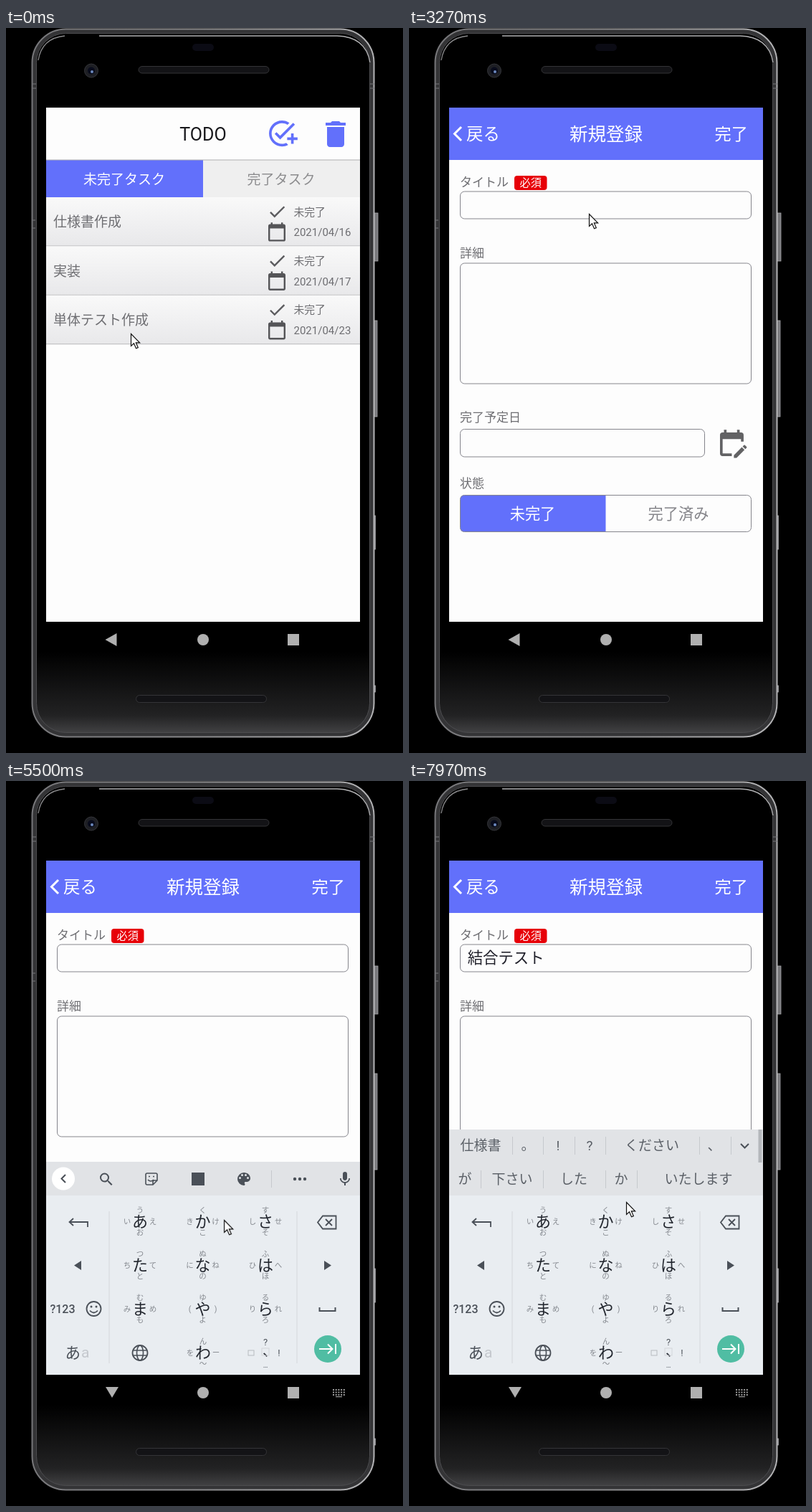
Write an HTML page that moves like this. It is 554x1011 px and loops after 8000 ms.

```html
<!DOCTYPE html>
<html lang="ja">
<head>
<meta charset="utf-8">
<title>TODO</title>
<style>
html, body { margin: 0; width: 100%; height: 100%; overflow: hidden; background: #000; }
svg { display: block; width: 554px; height: 1011px; }
text { font-family: Roboto, "Noto Sans CJK JP", "Noto Sans CJK", sans-serif; white-space: pre; }
.step { animation: 8s step-end infinite; }
.list { animation-name: list; }
.form { animation-name: form; }
.idle { animation-name: idle; }
.typing { animation-name: typing; }
.done { animation-name: done; }
.plain { animation-name: plain; }
.closed { animation-name: closed; }
.open { animation-name: open; }
.caret { animation-name: caret; }
.caret2 { animation-name: caret2; }
.keyboard { animation: rise 8s linear infinite; }
.cursor { animation: move 8s ease-in-out infinite; }
@keyframes list { 0% { opacity: 1 } 28%, to { opacity: 0 } }
@keyframes form { 0% { opacity: 0 } 28%, to { opacity: 1 } }
@keyframes closed { 0% { opacity: 1 } 49%, to { opacity: 0 } }
@keyframes open { 0% { opacity: 0 } 49%, to { opacity: 1 } }
@keyframes idle { 0% { opacity: 1 } 69%, to { opacity: 0 } }
@keyframes typing { 0% { opacity: 0 } 69% { opacity: 1 } 87.5%, to { opacity: 0 } }
@keyframes done { 0% { opacity: 0 } 87.5%, to { opacity: 1 } }
@keyframes plain { 0% { opacity: 1 } 69% { opacity: 0 } 87.5%, to { opacity: 1 } }
@keyframes caret { 0% { opacity: 0 } 48.75% { opacity: 1 } 55% { opacity: 0 } 61.25% { opacity: 1 } 67.5%, to { opacity: 0 } }
@keyframes caret2 { 0% { opacity: 0 } 87.5% { opacity: 1 } 93.75%, to { opacity: 0 } }
@keyframes rise {
  0%, 48.75% { transform: translateY(300px); animation-timing-function: ease-out }
  51%, to { transform: none }
}
@keyframes move {
  0%, 6% { transform: translate(174px, 426px) }
  20%, 30.5% { transform: translate(387px, 154px) }
  40%, 54% { transform: translate(251px, 259px); animation-timing-function: ease-in }
  60.375% { transform: translate(261px, 487px); animation-timing-function: ease-out }
  65%, 67% { transform: translate(272px, 610px) }
  69%, 70% { transform: translate(305px, 612px) }
  75.5%, 77% { transform: translate(187px, 669px) }
  84%, 88% { transform: translate(121px, 504px) }
  91%, 92% { transform: translate(132px, 520px) }
  99%, to { transform: translate(303px, 587px) }
}
</style>
</head>
<body>
<svg id="stage" viewBox="0 0 554 1011"></svg>
<script>
const BLUE = '#6270fb', GREY = '#6e6e72', INK = '#4a5058', DARK = '#22262e';

const text = (x, y, s, size, fill = GREY, anchor = 'start', more = '') =>
  `<text x="${x}" y="${y}" font-size="${size}" fill="${fill}" text-anchor="${anchor}" ${more}>${s}</text>`;
const mid = (x, y, s, size, fill, more) => text(x, y, s, size, fill, 'middle', more);
const rect = (x, y, w, h, fill, more = '') =>
  `<rect x="${x}" y="${y}" width="${w}" height="${h}" fill="${fill}" ${more}/>`;
const disc = (x, y, r, fill, more = '') => `<circle cx="${x}" cy="${y}" r="${r}" fill="${fill}" ${more}/>`;
const fill = (d, color) => `<path d="${d}" fill="${color}"/>`;
const line = (d, color, w = 2) => `<path d="${d}" fill="none" stroke="${color}" stroke-width="${w}"/>`;
const icon = (x, y, k, color, d) => `<path transform="translate(${x} ${y}) scale(${k})" fill="${color}" d="${d}"/>`;
const group = (cls, ...parts) => `<g class="${cls}">${parts.join('')}</g>`;
const step = (cls, ...parts) => group('step ' + cls, ...parts);

const ICONS = {
  addTask: 'M22 5.18 10.59 16.6l-4.24-4.24 1.41-1.41 2.83 2.83 10-10zM12 20c-4.41 0-8-3.59-8-8s3.59-8 8-8c1.57 0 3.04.46 4.28 1.25l1.45-1.45C16.1 2.67 14.13 2 12 2 6.48 2 2 6.48 2 12s4.48 10 10 10c1.73 0 3.36-.44 4.78-1.22l-1.5-1.5c-1 .46-2.11.72-3.28.72zM19 15h-3v2h3v3h2v-3h3v-2h-3v-3h-2z',
  trash: 'M6 19c0 1.1.9 2 2 2h8c1.1 0 2-.9 2-2V7H6zM19 4h-3.5l-1-1h-5l-1 1H5v2h14z',
  check: 'M9 16.17 4.83 12l-1.42 1.41L9 19 21 7l-1.41-1.41z',
  calendar: 'M20 3h-1V1h-2v2H7V1H5v2H4c-1.1 0-2 .9-2 2v16c0 1.1.9 2 2 2h16c1.1 0 2-.9 2-2V5c0-1.1-.9-2-2-2zm0 18H4V8h16z',
  dueDate: 'M19 3H18V1H16V3H8V1H6V3H5A2 2 0 0 0 3 5V19A2 2 0 0 0 5 21H12V19H5V8H19V10H21V5A2 2 0 0 0 19 3',
  pencil: 'M21.7 13.35 20.7 14.35 18.65 12.35 19.65 11.35C19.85 11.14 20.19 11.13 20.42 11.35L21.7 12.63C21.89 12.83 21.89 13.15 21.7 13.35M12 18.94 18.07 12.88 20.12 14.93 14.06 21H12Z',
  search: 'M15.5 14h-.79l-.28-.27A6.47 6.47 0 0 0 16 9.5 6.5 6.5 0 1 0 9.5 16c1.61 0 3.09-.59 4.23-1.57l.27.28v.79l5 4.99L20.49 19zm-6 0a4.5 4.5 0 1 1 0-9 4.5 4.5 0 0 1 0 9z',
  palette: 'M12 3a9 9 0 0 0 0 18c.83 0 1.5-.67 1.5-1.5 0-.39-.15-.74-.39-1.01-.23-.26-.38-.61-.38-.99 0-.83.67-1.5 1.5-1.5H16c2.76 0 5-2.24 5-5 0-4.42-4.03-8-9-8zm-5.5 9a1.5 1.5 0 1 1 0-3 1.5 1.5 0 0 1 0 3zm3-4a1.5 1.5 0 1 1 0-3 1.5 1.5 0 0 1 0 3zm5 0a1.5 1.5 0 1 1 0-3 1.5 1.5 0 0 1 0 3zm3 4a1.5 1.5 0 1 1 0-3 1.5 1.5 0 0 1 0 3z',
  mic: 'M12 14c1.66 0 3-1.34 3-3V5a3 3 0 0 0-6 0v6c0 1.66 1.34 3 3 3zm5.3-3c0 3-2.54 5.1-5.3 5.1S6.7 14 6.7 11H5c0 3.41 2.72 6.23 6 6.72V21h2v-3.28c3.28-.48 6-3.3 6-6.72z'
};

function phone() {
  const body = (inset, r, color, w) =>
    rect(36.5 + inset, 1.5 + inset, 477 - 2 * inset, 987 - 2 * inset, 'none', `rx="${r}" stroke="${color}" stroke-width="${w}"`);
  const pill = (x, y, w, h) => rect(x, y, w, h, '#131316', 'rx="5" stroke="#343437"');
  const button = (y, h, w) => rect(514, y, w, h, '#77777a', 'stroke="#a9a9ac" stroke-width=".8"');
  return rect(0, 0, 554, 1011, '#000') +
    button(258, 67, 5) + button(408, 134, 4) + button(680, 47, 1.5) + button(917, 9, 1.5) +
    rect(37, 2, 476, 986, 'url(#shade)', 'rx="47"') +
    body(3, 44, '#343436', 6) + body(0, 47, 'url(#rim)', 2) + body(6, 41, '#4c4c4f', 1) +
    line('M130 11H462Q502 12 508 48', '#b0b0b2', 1.3) +
    line('M45 45Q50 14 82 11', '#88888a', 1.3) +
    line('M36 78h6M36 84h6M508 78h6M508 84h6M36 268h5M36 279h5', '#77777a', 1) +
    disc(119, 59.5, 9.5, '#1e1f24', 'stroke="#35363a"') + disc(119, 59.5, 5, '#080b1c') + disc(120, 61, 2, '#6d8bc0') +
    rect(260, 22, 30, 10, '#0b0b14', 'rx="5"') +
    pill(185, 53.5, 182, 9.5) + pill(181.5, 930.5, 182, 10);
}

function row(name, date, i) {
  const y = 236 + i * 68.4;
  return rect(56, y, 438, 68.4, 'url(#row)') + rect(56, y + 67.4, 438, 1, '#bcbcbe') +
    text(66, y + 41.3, name, 19) +
    icon(364, y + 5.7, 1.2, '#5c5c5f', ICONS.check) +
    icon(363.6, y + 34, 1.2, '#555558', ICONS.calendar) +
    text(401.5, y + 25.5, '未完了', 14.8) + text(401.5, y + 54.3, date, 15);
}

function listScreen() {
  return mid(275, 157, 'TODO', 25, '#18181c') +
    icon(363.4, 125.4, 1.81, BLUE, ICONS.addTask) + icon(436, 124, 2, BLUE, ICONS.trash) +
    rect(56, 184, 219, 52, BLUE) + rect(275, 184, 219, 52, '#efefef') + rect(56, 183.5, 438, 1, '#adadb0') +
    mid(165, 218, '未完了タスク', 19, '#fff') + mid(384, 218, '完了タスク', 19, '#8c8c8e') +
    row('仕様書作成', '2021/04/16', 0) + row('実装', '2021/04/17', 1) + row('単体テスト作成', '2021/04/23', 2);
}

function formScreen() {
  const field = (y, w, h) => rect(71.5, y + .5, w, h, 'none', 'rx="6" stroke="#85858c"');
  return rect(56, 111, 438, 717, '#fdfdfd') + rect(56, 111, 438, 73, BLUE) +
    line('M73 138l-9.5 9.5 9.5 9.5', '#fff', 3) +
    text(80, 156, '戻る', 23.4, '#fff') + mid(275, 157, '新規登録', 25.5, '#fff') + text(426.5, 156, '完了', 23.2, '#fff') +
    text(71, 221, 'タイトル', 17) + rect(147, 206, 45.5, 20, '#e70008', 'rx="4"') + mid(169.7, 221.3, '必須', 15.2, '#fff') +
    field(227.5, 406, 38) + text(71, 320, '詳細', 17) + field(327.5, 406, 168) +
    text(71, 548.5, '完了予定日', 17) + field(559, 341, 38.5) +
    icon(428.5, 558.5, 1.83, '#626264', ICONS.dueDate) + icon(431.4, 561, 1.83, '#626264', ICONS.pencil) +
    text(71, 641.3, '状態', 17) +
    fill('M77 651.5H274.5V702.5H77Q71.5 702.5 71.5 697V657Q71.5 651.5 77 651.5Z', BLUE) + field(651, 406, 51) +
    mid(172.5, 684.8, '未完了', 21.2, '#fff') + mid(376, 684.8, '完了済み', 21.2, '#85858a') +
    step('caret', rect(82, 233, 1.5, 28, '#38b7c8')) +
    step('typing', rect(82, 233, 23, 28, 'url(#mark)'), text(82.5, 254, 'け', 21.4, '#20242c'), rect(82.5, 257, 21, 1.3, '#20242c')) +
    step('done', text(81.7, 254.3, '結合テスト', 21.4, '#20202a')) +
    step('caret2', rect(189.5, 233, 1.5, 28, '#38b7c8'));
}

function kana(keys, x, y) {
  const [main, left, top, right, bottom] = keys;
  const small = (dx, dy, s) => mid(x + dx, y + dy, s, 10.5, '#85898f');
  return mid(x, y + 8, main, 22, DARK) + small(-18, 4, left) + small(0, -12, top) + small(18, 4, right) + small(0, 19, bottom);
}

// items: [centre, label] pairs; bars: divider positions.
function candidates(y, items, bars) {
  return items.map(([x, s]) => mid(x, y + 7, s, 19, '#5b6067')).join('') +
    bars.map(x => rect(x, y - 12, 1, 25, '#c6c9cd')).join('');
}

const strip = (...parts) => rect(56, 486, 438, 92, '#e1e3e6') + rect(487.5, 486, 5, 46, '#b4b7bb') +
  line('M463 506l5.5 5.5 5.5-5.5', INK) + parts.join('');

function toolbar() {
  return rect(56, 531, 438, 47, '#e1e3e6') + disc(80, 554.5, 16, '#fff') +
    line('M83 549l-5.5 5.5 5.5 5.5', INK) +
    icon(128, 543.5, 1, INK, ICONS.search) +
    line('M197 547h12q2 0 2 2v8l-6 6h-8q-2 0-2-2v-12q0-2 2-2zM211 557h-4q-2 0-2 2v4M198 556q4 4 8 0M199 551.5h2M205 551.5h2', INK, 1.6) +
    rect(259, 546, 18, 18, INK) +
    icon(320, 543, 1, INK, ICONS.palette) + rect(370, 543, 1, 24, '#c6c9cd') +
    [403, 410, 417].map(x => disc(x, 555, 2.2, INK)).join('') + icon(461, 543, 1, INK, ICONS.mic);
}

function keyboard() {
  const keys = ['あいうえお', 'かきくけこ', 'さしすせそ', 'たちつてと', 'なにぬねの', 'はひふへほ', 'まみむめも', 'や(ゆ)よ', 'らりるれろ'];
  const note = (x, y, s) => mid(x, y, s, 10.8, INK);
  const ring = (x, y, r, color, w) => disc(x, y, r, 'none', `stroke="${color}" stroke-width="${w}"`);
  return step('idle', toolbar()) +
    step('typing', strip(
      candidates(508, [[121, '結合テスト'], [208, 'け'], [252, '家'], [296, '毛'], [382, 'けど']], [187, 231, 274, 318, 449]),
      candidates(555, [[86, 'ケ'], [165, '件'], [208, 'げ'], [260, 'ケア'], [339, '券'], [382, '権'], [427, 'ヶ']], [144, 187, 231, 318, 361, 405]),
      note(131, 570, '[全]'), note(304, 570, '[全]'), note(463, 556, '[全]'), note(470.5, 570, '小書き'))) +
    step('done', strip(
      candidates(508, [[100, '仕様書'], [166, '。'], [208, '!'], [252, '?'], [339, 'ください'], [426, '、']], [144, 187, 231, 274, 405, 449]),
      candidates(555, [[78, 'が'], [144, '下さい'], [230, 'した'], [296, 'か'], [404, 'いたします']], [100, 187, 274, 318]))) +
    rect(56, 578, 438, 250, '#e9edf1') + rect(143.5, 600, 1, 212, '#d5d8dc') + rect(405.5, 600, 1, 212, '#d5d8dc') +
    keys.map((k, i) => kana(k, 187 + i % 3 * 87.5, 614 + (i / 3 | 0) * 61)).join('') +
    kana('わをんー〜', 275, 797) +
    mid(368, 802, '、', 20, DARK) + mid(362, 787, '?', 13, INK) + mid(381, 802, '!', 13, INK) + mid(362, 818, '…', 10, INK) +
    rect(338, 794, 8, 7, 'none', 'stroke="#b7bbc0"') + rect(357, 791, 10, 10, 'none', 'stroke="#d3d6da"') +
    line('M114 622V615H89M94 610l-5.5 5 5.5 5', INK, 1.8) +
    fill('M95 675.5l10-6.5v13zM454 675.5l-10-6.5v13z', INK) +
    mid(79, 742, '?123', 16, INK, 'font-weight="500"') +
    ring(122.5, 736, 10, INK, 1.8) +
    disc(119, 733, 1.5, INK) + disc(126, 733, 1.5, INK) + line('M117 738.5q5.5 6 11 0', INK, 1.8) +
    text(82.5, 805, 'あ', 21.5, INK) + text(105, 804, 'a', 21, '#c4c8cd') +
    step('plain', ring(187, 797.5, 10.5, INK, 1.8),
      `<ellipse cx="187" cy="797.5" rx="4.5" ry="10.5" fill="none" stroke="${INK}" stroke-width="1.6"/>`,
      line('M177 794h20M177 801h20', INK, 1.6)) +
    step('typing', line('M172 788l3.5 6M178 786l3.5 6', DARK, 2.5), ring(199.5, 789, 4, DARK, 2),
      mid(187, 811, '大⇔小', 9.5, INK)) +
    line('M442 606.5H460.5V624.5H442L435 615.5ZM446 611l9 9M455 611l-9 9', INK, 1.8) +
    line('M437.5 734v5H459.5v-5', INK, 2) + disc(449, 792, 19, '#50bda3') +
    step('plain', line('M437 792h18M449 785.5l6.5 6.5-6.5 6.5M460 785v14', '#fff', 2)) +
    step('typing', line('M459 786v6H440M445.5 786l-6 6 6 6', '#fff', 2));
}

function navBar() {
  let dots = '';
  for (let i = 0; i < 15; i++) dots += rect(456 + i % 5 * 3.7, 848 + (i / 5 | 0) * 3.5, 2, 2, '#9c9c9c');
  return step('closed', fill('M138.5 853L154.5 844V862Z', '#b0b0b0')) +
    step('open', fill('M139 845H157L148 860Z', '#b0b0b0'), dots, rect(460, 858, 9, 1.2, '#9c9c9c')) +
    disc(275, 853, 8, '#b0b0b0') + rect(393, 845, 16, 16, '#b0b0b0');
}

// Evenly spaced colour stops, running down or across.
const gradient = (id, down, ...colors) =>
  `<linearGradient id="${id}" x1="0" y1="0" x2="${down ? 0 : 1}" y2="${down ? 1 : 0}">` +
  colors.map((c, i) => `<stop offset="${i / (colors.length - 1)}" stop-color="${c}"/>`).join('') + '</linearGradient>';

document.getElementById('stage').innerHTML =
  `<defs>${gradient('row', true, '#f9f9f9', '#e8e8ea')}${gradient('mark', false, '#a9dcba', '#a9d4dc')}
    ${gradient('rim', false, '#77777a', '#8a8a8c', '#b4b4b6')}
    <linearGradient id="shade" x1="0" y1="0" x2="0" y2="1">
      <stop offset=".88"/><stop offset=".97" stop-color="#222223"/><stop offset="1" stop-color="#48484a"/>
    </linearGradient>
    <clipPath id="screen"><rect x="56" y="111" width="438" height="717"/></clipPath></defs>` +
  phone() +
  `<g clip-path="url(#screen)">${rect(56, 111, 438, 717, '#fdfdfd')}` +
  step('list', listScreen()) + step('form', formScreen()) + group('keyboard', keyboard()) + '</g>' +
  navBar() +
  group('cursor', '<path d="M.5 .5V17.5L4.5 13.8 7.5 20.8 10.3 19.6 7.3 12.8H12.6Z" fill="#fff" stroke="#111" stroke-width="1.2"/>');
</script>
</body>
</html>
```
